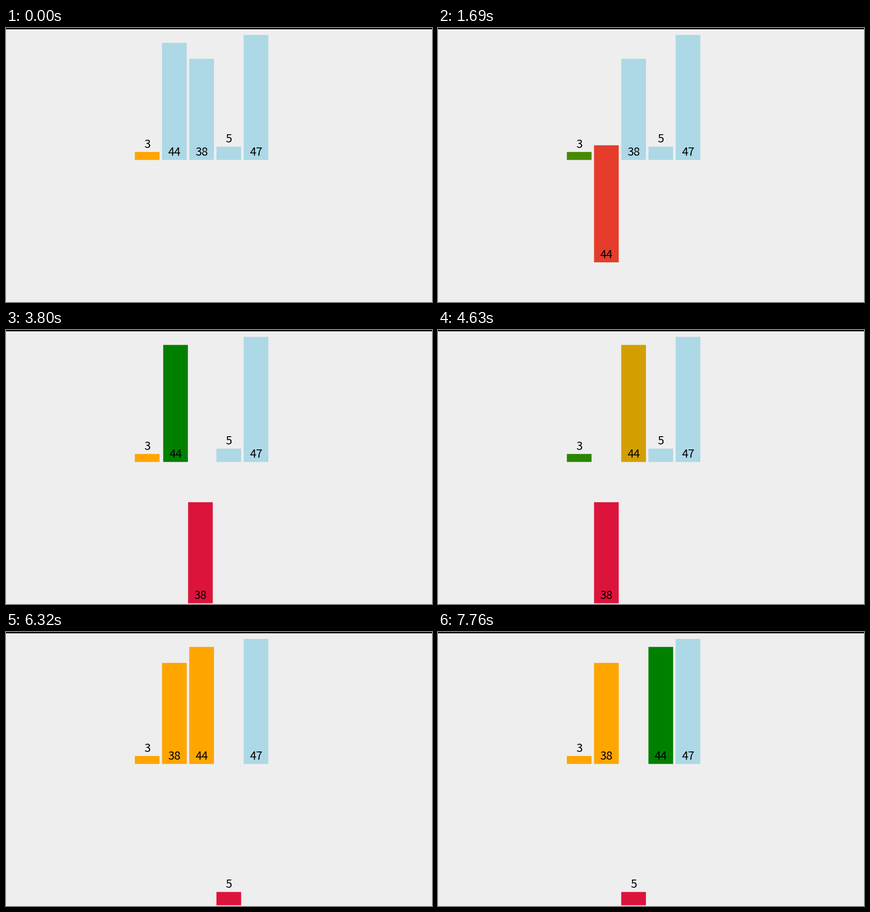
Write a matplotlib script that moves like this. It is 932 px wide and 601 px high and loops after 8000 ms.

```python
import numpy as np
import matplotlib.pyplot as plt
from matplotlib.animation import FuncAnimation
from matplotlib.colors import to_rgb
from matplotlib.patches import Rectangle

W, H, DPI = 932, 601, 100
LOOP, STEP = 8000, 20
LEFT, PITCH, BAR_W = 281.9, 59.5, 54
BASE, DROP, UNIT = 289.4, 310, 35 / 6
MOVE = 200  # length of one transition, ms

VALUES = (3, 44, 38, 5, 47)
IDLE, SORTED, ACTIVE, COMPARE = map(
    to_rgb, ("lightblue", "orange", "crimson", "green"))

# (start in ms, value, changes); slot and drop are in bar places and depths
ACTIONS = [
    (150, 44, dict(drop=1, color=ACTIVE)),
    (860, 3, dict(color=COMPARE)),
    (1608, 44, dict(drop=0, color=SORTED)),
    (1608, 3, dict(color=SORTED)),
    (2315, 38, dict(drop=1, color=ACTIVE)),
    (3035, 44, dict(color=COMPARE)),
    (3756, 44, dict(slot=2)),
    (3756, 38, dict(slot=1)),
    (4500, 44, dict(color=SORTED)),
    (4500, 3, dict(color=COMPARE)),
    (5228, 38, dict(drop=0, color=SORTED)),
    (5228, 3, dict(color=SORTED)),
    (5964, 5, dict(drop=1, color=ACTIVE)),
    (6692, 44, dict(color=COMPARE)),
    (7410, 44, dict(slot=3)),
    (7410, 5, dict(slot=2)),
]

# The picture refreshes only at these moments
TICKS = [0, 270, 390, 920, 1040, 1690, 1810, 2390, 2510, 3120, 3240,
         3800, 3950, 4070, 4630, 4750, 5340, 5460, 6020, 6170,
         6810, 6930, 7490, 7610]


def ease(u):
    u = min(max(u, 0), 1)
    return 4 * u ** 3 if u < 0.5 else 1 - 4 * (1 - u) ** 3


def state_at(t):
    bars = {v: dict(slot=i, drop=0, color=SORTED if i == 0 else IDLE)
            for i, v in enumerate(VALUES)}
    for start, value, changes in ACTIONS:
        p = ease((t - start) / MOVE)
        for key, goal in changes.items():
            now = np.array(bars[value][key], float)
            bars[value][key] = now + (np.array(goal) - now) * p
    return bars


fig = plt.figure(figsize=(W / DPI, H / DPI), dpi=DPI, facecolor="#eeeeee")
ax = fig.add_axes([0, 0, 1, 1])
ax.set(xlim=(0, W), ylim=(H, 0))
ax.axis("off")
ax.add_patch(Rectangle((0, 0), W, 2.8, fc="black", lw=0, snap=False))

rects, labels = {}, {}
for v in VALUES:
    rects[v] = ax.add_patch(
        Rectangle((0, 0), BAR_W, v * UNIT, lw=0, snap=False))
    labels[v] = ax.text(0, 0, str(v), family="Noto Sans CJK JP", size=18,
                        color="black", ha="center", va="baseline", zorder=5)


def draw(i):
    t = i * STEP + STEP / 2
    shown = max(k for k in TICKS if k <= t)
    for v, bar in state_at(shown).items():
        x = LEFT + PITCH * bar["slot"]
        bottom = BASE + DROP * bar["drop"]
        top = bottom - v * UNIT
        rects[v].set_xy((x, top))
        rects[v].set_facecolor(tuple(bar["color"]))
        labels[v].set_position((x + BAR_W / 2, (top if v < 10 else bottom) - 9))
    return [*rects.values(), *labels.values()]


anim = FuncAnimation(fig, draw, frames=LOOP // STEP, interval=STEP,
                     repeat=True, repeat_delay=0, blit=False)
plt.show()
```
